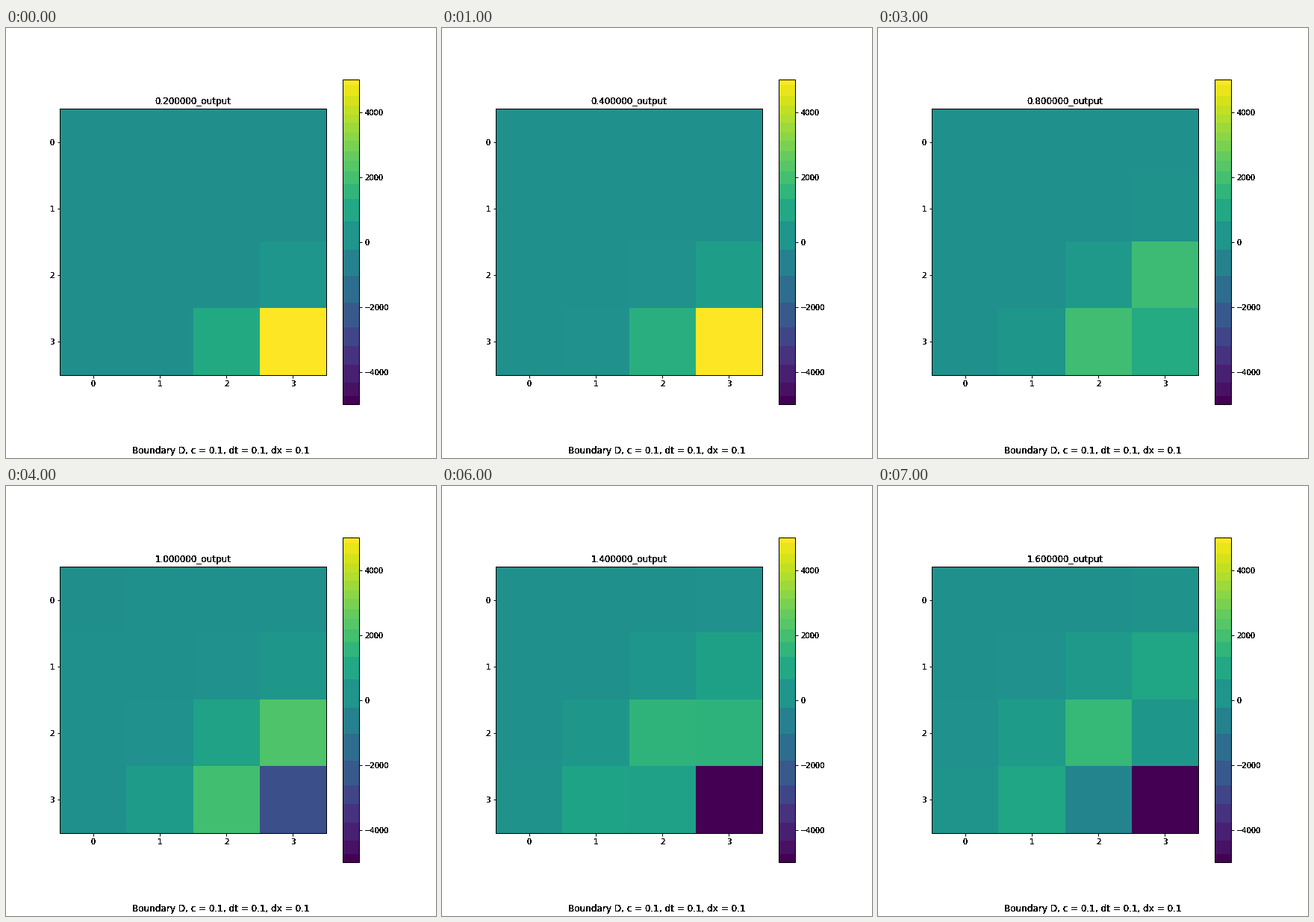
Write a matplotlib script that moves like this. It is 576 px wide and 576 px high and loops after 8000 ms.

```python
import numpy as np
import matplotlib as mpl
import matplotlib.pyplot as plt
from matplotlib.animation import FuncAnimation
from matplotlib.cm import ScalarMappable
from matplotlib.colors import ListedColormap, Normalize

mpl.rcParams.update({
    "font.family": "DejaVu Sans",
    "figure.subplot.bottom": 0.125,
    "axes.linewidth": 1,
    "xtick.major.width": 1,
    "ytick.major.width": 1,
})

STEPS = 8
STIFFNESS = 0.045  # squared wave speed per time step
NORM = Normalize(-5000, 5000)
VIRIDIS = mpl.colormaps["viridis"]


def laplacian(u):
    """Sum of neighbour differences, with zero held outside the grid."""
    p = np.pad(u, 1)
    return p[:-2, 1:-1] + p[2:, 1:-1] + p[1:-1, :-2] + p[1:-1, 2:] - 4 * u


def simulate():
    """A wave released from rest at the lower right corner."""
    u = np.zeros((4, 4))
    u[3, 3], u[3, 2], u[2, 3] = 9400, 1080, 240
    velocity = np.zeros_like(u)
    states = []
    for _ in range(STEPS):
        states.append(u)
        velocity = velocity + STIFFNESS * laplacian(u)
        u = u + velocity
    return states


def banded(cmap, bands=21, samples=240):
    """The colormap in flat bands of equal colour distance."""
    x = np.linspace(0, 1, samples)
    lengths = np.linalg.norm(np.diff(cmap(x), axis=0), axis=1)
    path = np.concatenate([[0], np.cumsum(lengths)])
    path /= path[-1]
    levels = np.round(path * bands) / bands
    return ListedColormap(cmap(np.interp(levels, path, x)))


def harden(image, dpi):
    """Turn the soft edges of text solid."""
    image = image.copy()
    image[..., 3] = image[..., 3] > 0.2
    return image, 0, 0


states = simulate()
fig, ax = plt.subplots(figsize=(8, 8), dpi=72, facecolor="white")
image = ax.imshow(states[0], cmap=VIRIDIS, norm=NORM, interpolation="nearest")
ax.set_xticks(range(4))
ax.set_yticks(range(4))
bar = fig.colorbar(ScalarMappable(NORM, banded(VIRIDIS)), ax=ax,
                   ticks=range(-4000, 4001, 2000))
title = ax.set_title("", fontsize=12)
caption = fig.text(0.5, 0.01, "Boundary D, c = 0.1, dt = 0.1, dx = 0.1",
                   ha="center", fontsize=12)

labels = ax.get_xticklabels() + ax.get_yticklabels() + bar.ax.get_yticklabels()
for text in [title, caption, *labels]:
    text.set_agg_filter(harden)


def update(step):
    image.set_data(states[step])
    title.set_text(f"{0.2 * (step + 1):.6f}_output")
    return image, title


anim = FuncAnimation(fig, update, frames=STEPS, interval=1000,
                     repeat=True, repeat_delay=0, blit=False)
plt.show()
```
